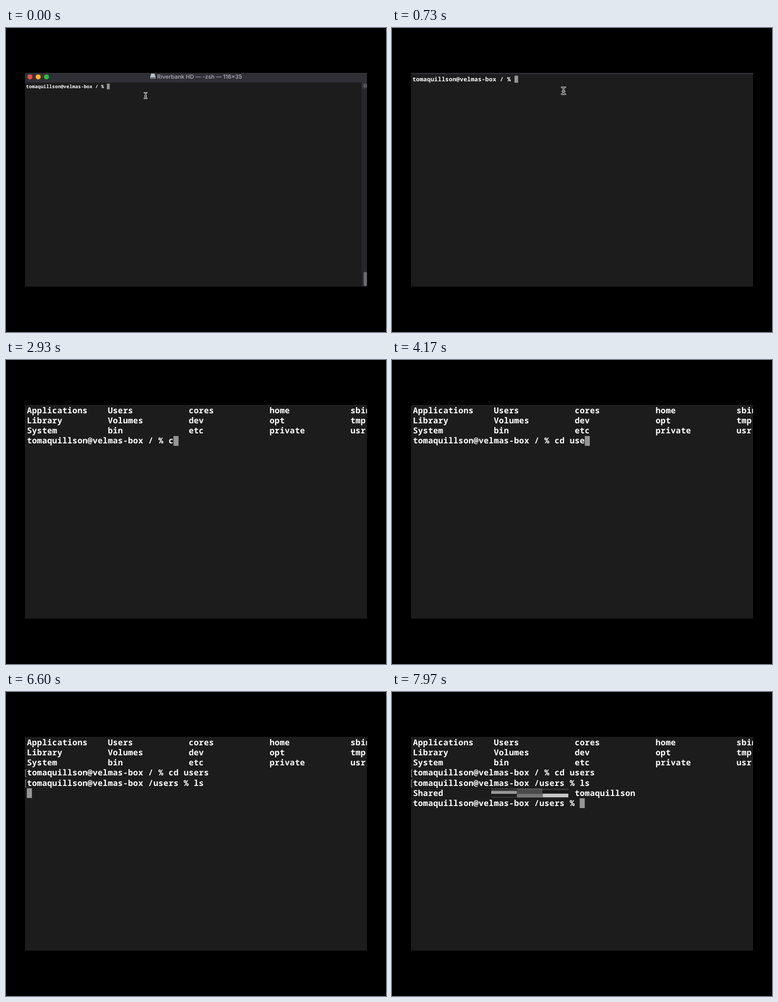
An HTML page with a canvas for the animation above (8 s loop, 720 by 576 pixels).

```html
<!DOCTYPE html>
<html lang="en">
<head>
<meta charset="utf-8">
<title>Terminal session</title>
<style>
  html, body { margin: 0; width: 100%; height: 100%; overflow: hidden; background: #000; }
  canvas { display: block; }
</style>
</head>
<body>
<canvas id="stage" width="720" height="576"></canvas>
<script>
const ctx = document.getElementById('stage').getContext('2d');
const LOOP = 8000, W = 648, H = 405;
const CELL = 5.465, ROW = 10.9, TOP = 20.5, LEFT = 2;
const USER = 'tomaquillson', HOST = USER + '@velmas-box ';
const ROOT = HOST + '/ % ', USERS = HOST + '/users % ';
const LISTING = [
  ['Applications', 'Users', 'cores', 'home', 'sbin'],
  ['Library', 'Volumes', 'dev', 'opt', 'tmp'],
  ['System', 'bin', 'etc', 'private', 'usr']
];
const LS_KEYS = [870, 1030];
const CD_KEYS = [2930, 3100, 3300, 3900, 4030, 4170, 4500, 4800];
const LS2_KEYS = [5300, 6470];

function rect(x, y, w, h, color) {
  ctx.fillStyle = color;
  ctx.fillRect(x, y, w, h);
}

function round(x, y, w, h, r, color) {
  ctx.fillStyle = color;
  ctx.beginPath();
  ctx.roundRect(x, y, w, h, r);
  ctx.fill();
}

// Terminal text sits on a fixed character grid.
function print(text, row, col = 0) {
  ctx.font = '600 8.85px "Noto Sans Mono", "DejaVu Sans Mono", monospace';
  ctx.textAlign = 'center';
  ctx.textBaseline = 'alphabetic';
  ctx.fillStyle = '#fff';
  [...text].forEach((c, i) =>
    ctx.fillText(c, LEFT + (col + i + 0.5) * CELL, TOP + row * ROW + 8.2));
}

function caret(row, col) {
  rect(LEFT + col * CELL, TOP + row * ROW, CELL, 10.6, '#959595');
}

function prompt(text, row, active) {
  print(text, row);
  if (active) caret(row, text.length);
  else mark(row);
}

function mark(row) {
  const y = TOP + row * ROW + 2;
  ctx.strokeStyle = '#999';
  ctx.lineWidth = 0.6;
  ctx.beginPath();
  ctx.moveTo(1.6, y);
  ctx.lineTo(0.4, y);
  ctx.lineTo(0.4, y + 7.4);
  ctx.lineTo(1.6, y + 7.4);
  ctx.stroke();
}

const typed = (text, keys, t) => text.slice(0, keys.filter(k => k <= t + 3).length);

function titleBar() {
  rect(0, 0, W, 18.4, '#302f36');
  ['#ff4b43', '#fdb42c', '#29bd3e'].forEach((color, i) =>
    round(4.6 + i * 15.6, 2.9, 9.6, 9.6, 4.8, color));
  ctx.fillStyle = '#b9c4c8';
  ctx.beginPath();
  ctx.moveTo(239, 1.5);
  ctx.lineTo(245.5, 1.5);
  ctx.lineTo(247.6, 8.5);
  ctx.lineTo(237, 8.5);
  ctx.fill();
  rect(237, 8.3, 10.6, 3, '#77797d');
  ctx.font = '600 10.6px Inter, "Liberation Sans", sans-serif';
  ctx.textAlign = 'center';
  ctx.textBaseline = 'alphabetic';
  ctx.fillStyle = '#a5a4aa';
  ctx.fillText('Riverbank HD — -zsh — 116×35', 330.8, 11.4);
}

function scrollBar() {
  rect(638, 18.4, 10, H, '#27262d');
  rect(638, 18.4, 10, 12.4, '#34333a');
  ctx.strokeStyle = '#85848a';
  ctx.lineWidth = 0.8;
  ctx.strokeRect(642.2, 21.8, 5, 5);
  ctx.beginPath();
  ctx.moveTo(642.2, 24.3);
  ctx.lineTo(647.2, 24.3);
  ctx.stroke();
  round(641.6, 377, 6.4, 27, 3, '#6a696f');
}

function pointer(x, y) {
  const beam = new Path2D('M-2.5-5.2Q0-5.2 0-3.6Q0-5.2 2.5-5.2M0-3.6V3.6M-2.5 5.2Q0 5.2 0 3.6Q0 5.2 2.5 5.2M-1.5 1H1.5');
  ctx.save();
  ctx.translate(x, y);
  ctx.lineCap = 'round';
  for (const [color, width] of [['#f4f4f4', 2.4], ['#161616', 0.9]]) {
    ctx.strokeStyle = color;
    ctx.lineWidth = width;
    ctx.stroke(beam);
  }
  ctx.restore();
}

function openingShot(t) {
  const zoom = 0.264 * Math.pow(Math.max(0, t - 30) / 700, 1.315);
  ctx.save();
  ctx.translate(0, -78 * zoom);
  ctx.scale(1 + zoom, 1 + zoom);
  titleBar();
  scrollBar();
  prompt(ROOT + typed('ls', LS_KEYS, t), 0, true);
  if (t < LS_KEYS[0]) pointer(228.5, 43);
  ctx.restore();
}

// Flickering mosaic that hides one directory name.
function mosaic(t) {
  const frame = Math.floor((t + 4) * 0.03);
  const noise = k => {
    const v = Math.sin(frame * 12.99 + k * 78.23) * 43758.5;
    return v - Math.floor(v);
  };
  // column, top, height, shade
  const bands = [
    [0, 0, 17, 20], [0, 0, 1, 95], [0, 1, 3, 48], [0, 4, 6, 125], [0, 7, 2, 150], [0, 16, 1, 85],
    [1, 0, 10, 90], [1, 10, 7, 118], [1, 0, 1, 110],
    [2, 0, 17, 18], [2, 0, 3, 58], [2, 9, 1, 110], [2, 10, 6, 190], [2, 16, 1, 120]
  ];
  bands.forEach(([col, y, h, shade], i) => {
    const v = Math.round(shade + (noise(i) - 0.5) * Math.min(shade, 40));
    rect(152 + col * 48.7, 98 + y, 48.7, h, `rgb(${v},${v},${v})`);
  });
}

function closeShot(t) {
  rect(0, 0, W, H, '#1c1c1c');
  ctx.save();
  ctx.translate(0, -53.3);
  ctx.scale(1.753, 1.753);
  LISTING.forEach((names, r) => names.forEach((name, c) => print(name, r + 1, c * 16)));
  prompt(ROOT + typed('cd users', CD_KEYS, t), 4, t < 4967);
  if (t >= 4997) prompt(USERS + typed('ls', LS2_KEYS, t), 5, t < 6597);
  else if (t >= 4967) caret(5, 0);
  if (t >= 6767) {
    print('Shared', 6);
    print(USER, 6, 32);
    prompt(USERS, 7, true);
  } else if (t >= 6597) caret(6, 0);
  ctx.restore();
  if (t >= 6767) mosaic(t);
}

function draw(now) {
  const t = now % LOOP;
  const fade = Math.pow(Math.min(1, Math.max(0, (t - 870) / 800)), 1.3);
  rect(0, 0, 720, 576, '#000');
  ctx.save();
  ctx.translate(36, 85);
  ctx.beginPath();
  ctx.rect(0, 0, W, H);
  ctx.clip();
  rect(0, 0, W, H, '#1c1c1c');
  if (fade < 1) openingShot(t);
  if (fade > 0) {
    ctx.globalAlpha = fade;
    closeShot(t);
  }
  ctx.restore();
}

ctx.textRendering = 'geometricPrecision';
const start = performance.now();
function tick() {
  draw(performance.now() - start);
  requestAnimationFrame(tick);
}
tick();
</script>
</body>
</html>
```
